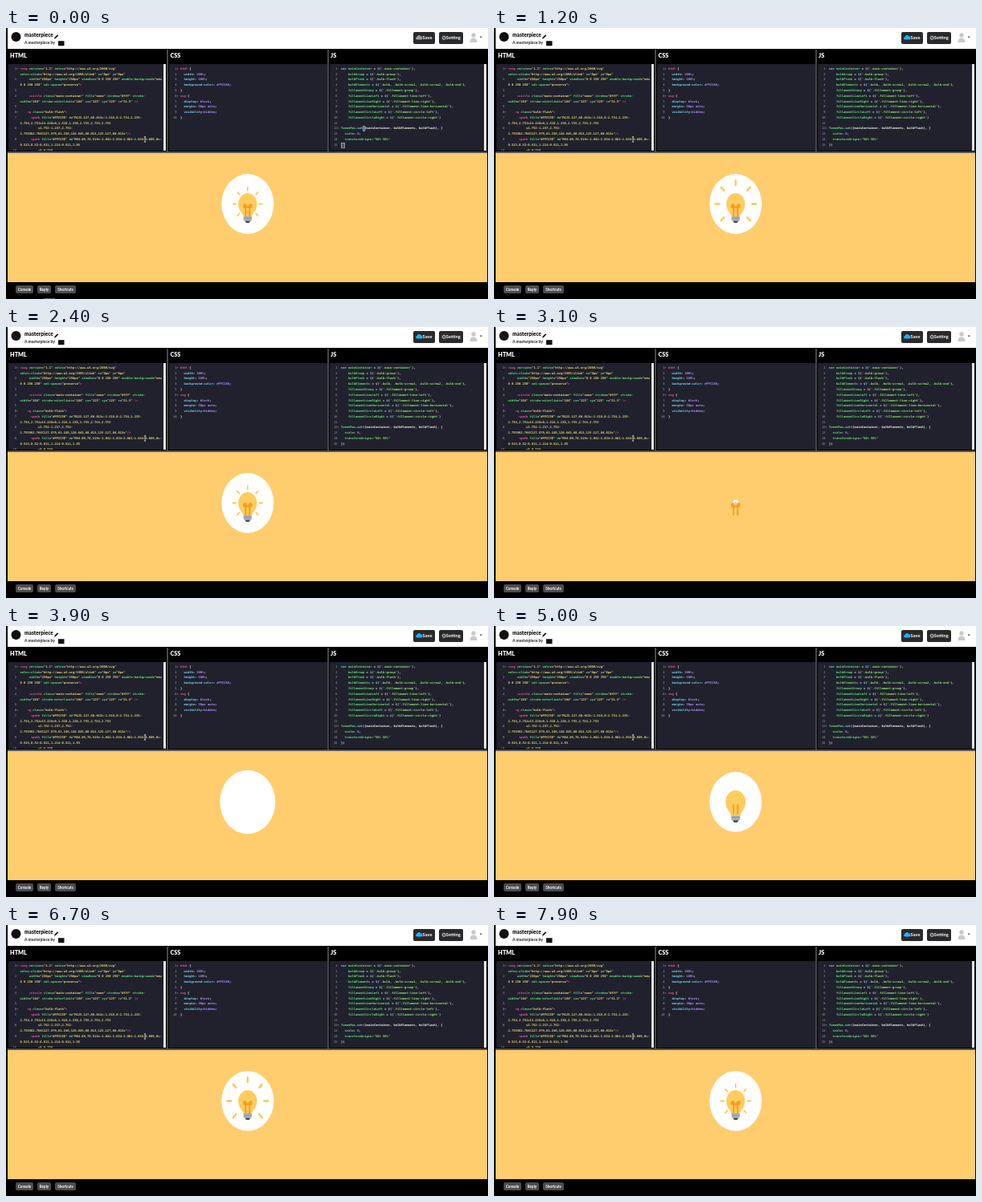
Write an HTML page that moves like this. It is 600 px wide and 338 px high and loops after 8000 ms.

```html
<!DOCTYPE html>
<html lang="en">
<head>
<meta charset="utf-8">
<title>masterpiece</title>
<style>
html, body { margin: 0; width: 100%; height: 100%; overflow: hidden; background: #000; }
#stage { position: relative; width: 600px; height: 338px; overflow: hidden; background: #000; font-family: Lato, "Open Sans", sans-serif; }
#stage > * { position: absolute; }
#bar { left: 2px; top: 0; width: 598px; height: 25.6px; background: #fff; }
.label { font-weight: 900; line-height: 10px; white-space: nowrap; }
.btn { box-sizing: border-box; border-radius: 2px; color: #fff; font-weight: 700; text-align: center; white-space: nowrap; }
.top { top: 5px; height: 15px; line-height: 14.5px; font-size: 5.7px; background: #2a2a2d; }
.foot { top: 321px; height: 10px; line-height: 10px; font-size: 4.6px; background: #4c4c51; }
.panel { top: 45px; height: 108px; background: #20212d; overflow: hidden; }
.panel pre { position: absolute; top: 2.9px; margin: 0; font: 700 3.76px/6.78px "DejaVu Sans Mono", "Liberation Mono", monospace; color: #f4f4ee; white-space: pre; }
.panel .nums { left: 0; width: 12.3px; text-align: right; color: #a4a5ae; font-weight: 400; }
.panel .code { left: 14.5px; }
.scroll::after { content: ""; position: absolute; right: .3px; top: 0; width: 2.5px; height: 100%; background: #e9e9e4; }
.str { color: #e6db74; } .tag { color: #f0569a; } .attr { color: #62df78; }
.key { color: #7cd8ee; } .num { color: #b491ff; }
#js .str { color: #8fe673; }
.gap { top: 27px; width: 1.5px; height: 127px; background: #46464a; }
.match { box-sizing: border-box; height: 7px; background: #555762; border: .6px solid #b9bac2; opacity: .75; }
#out { left: 2px; top: 156px; width: 597.3px; height: 161.3px; background: #ffcc6e; }
#art { left: 0; top: 0; }
</style>
</head>
<body>
<div id="stage">
  <div id="bar"></div>
  <div class="label" style="left:23px;top:4px;font-size:6.5px;color:#111">masterpiece</div>
  <div class="label" style="left:23px;top:13px;font-size:4.9px;color:#444">A masterpiece by</div>
  <div class="btn top" style="left:507px;width:27px;padding-left:8px">Save</div>
  <div class="btn top" style="left:538.5px;width:30.5px;padding-left:6px">Setting</div>
  <div class="label" style="left:5px;top:30px;font-size:7.3px;color:#fff">HTML</div>
  <div class="label" style="left:204.5px;top:30px;font-size:7.3px;color:#fff">CSS</div>
  <div class="label" style="left:404px;top:30px;font-size:7.3px;color:#fff">JS</div>
  <div class="panel scroll" id="html" style="left:3px;width:196px"></div>
  <div class="panel" id="css" style="left:202.5px;width:197px"></div>
  <div class="panel scroll" id="js" style="left:402.5px;width:195.5px"></div>
  <div class="gap" style="left:200px"></div>
  <div class="gap" style="left:400.3px"></div>
  <div style="left:2px;top:153.6px;width:597.3px;height:2.4px;background:#55555a"></div>
  <div id="out"></div>
  <div class="btn foot" style="left:12px;width:22px">Console</div>
  <div class="btn foot" style="left:39px;width:17px">Reply</div>
  <div class="btn foot" style="left:61px;width:26px">Shortcuts</div>
  <div class="match focus" style="left:443.6px;top:122px;width:3px"></div>
  <div class="match focus" style="left:416.6px;top:142.6px;width:5.6px"></div>
  <div class="focus" style="left:47px;top:337px;width:14px;height:1px;background:#555"></div>

  <svg id="art" width="600" height="338" viewBox="0 0 600 338">
    <circle cx="12.5" cy="11" r="6" fill="#111"/>
    <path d="M60 13.8l.7-2.4 3.3-3.2 1.3 1.3-3.3 3.3z" fill="#111"/>
    <rect x="65" y="16.2" width="7.5" height="6" fill="#111"/>
    <path id="cloud" d="M511.8 14.6a1.8 1.8 0 0 1 0-3.6 2.3 2.3 0 0 1 4.4-.6 2.1 2.1 0 0 1 .5 4.2z"/>
    <circle cx="545.2" cy="12.3" r="1.7" fill="none" stroke="#ddd" stroke-width=".9"/>
    <circle cx="545.2" cy="12.3" r="2.4" fill="none" stroke="#ddd" stroke-width=".7" stroke-dasharray=".94"/>
    <g fill="#c9c9c9"><circle cx="582" cy="9" r="2.7"/><path d="M577.5 18q0-5.5 4.5-5.5t4.5 5.5z"/></g>
    <path d="M589.6 10.6h3l-1.5 1.8z" fill="#444"/>
    <path d="M171.8 135.8h2.4M173 135.8v6.2M171.8 142h2.4" fill="none" stroke="#e4e4e4" stroke-width=".8"/>
    <g transform="translate(300.8 219.5) scale(.314 .362)">
      <circle id="disc" r="103.5" fill="#fff"/>
      <g id="rays" fill="none" stroke="#ffc54d" stroke-width="7" stroke-linecap="round"></g>
      <g id="bulb">
        <path d="M-17 43C-17 34-37 24-37 0A37 37 0 0 1 37 0C37 24 17 34 17 43z" fill="#ffcc5e"/>
        <path d="M-16 43h32v13q0 2-3 2h-26q-3 0-3-2z" fill="#a9b0b7"/>
        <path d="M-16 49h32" stroke="#7f878f" stroke-width="2"/>
        <path d="M-11 58h22l-5 7h-12z" fill="#464a50"/>
      </g>
      <g fill="none" stroke="#f39a1e" stroke-width="6">
        <path id="wires" d="M-8 43v-35M8 43v-35" pathLength="35"/>
        <g id="coil"><path d="M-10 11h20"/><circle cx="-11" cy="7" r="4.5"/><circle cx="11" cy="7" r="4.5"/></g>
      </g>
    </g>
  </svg>
</div>
<script>
const LOOP = 8000, CYCLE = 5500, OFFSET = 2200, SAVED_AT = 500;
const $ = id => document.getElementById(id);

const sources = {
  html: `<svg version="1.1" xmlns="http://www.w3.org/2000/svg"
xmlns:xlink="http://www.w3.org/1999/xlink" x="0px" y="0px"
     width="250px" height="250px" viewBox="0 0 250 250" enable-background="new
0 0 250 250" xml:space="preserve">

     <circle class="main-container" fill="none" stroke="#fff" stroke-
width="104" stroke-miterlimit="104" cx="125" cy="125" r="51.5" />

    <g class="bulb-flash">
      <path fill="#FFCC5E" d="M125.127,60.013c-1.518,0-2.754,1.235-
2.754,2.751v13.226c0,1.518,1.236,2.755,2.754,2.755
          s2.752-1.237,2.752-
2.755V62.764C127.879,61.248,126.645,60.013,125.127,60.013z"/>
      <path fill="#FFCC5E" d="M84.09,78.519c-1.041-1.034-2.061-1.034-3.089,0c-
0.523,0.52-0.811,1.214-0.811,1.95
          c0,0.736`,
  css: `html {
  width: 100%;
  height: 100%;
  background-color: #FFCC6E;
}
svg {
  display: block;
  margin: 50px auto;
  visibility:hidden;
}`,
  js: `var mainContainer = $('.main-container'),
    bulbGroup = $('.bulb-group'),
    bulbFlash = $('.bulb-flash'),
    bulbElements = $('.bulb, .bulb-screw1, .bulb-screw2, .bulb-end'),
    fillamentGroup = $('.fillament-group'),
    fillamentLineLeft = $('.fillament-line-left'),
    fillamentLineRight = $('.fillament-line-right'),
    fillamentLineHorizontal = $('.fillament-line-horizontal'),
    fillamentCircleLeft = $('.fillament-circle-left'),
    fillamentCircleRight = $('.fillament-circle-right')

TweenMax.set([mainContainer, bulbElements, bulbFlash], {
  scale: 0,
  transformOrigin:"50% 50%"
})`
};

// Each language: a pattern whose named groups are the colour classes.
const grammars = {
  html: /(?<str>"[^"]*"?)|(?<tag><\w+|\/?>)|(?<attr>[\w:-]+)/g,
  css: /(?<tag>^\w+(?= \{))|(?<key>[\w-]+(?=:))|(?<num>#?\w+%?)/gm,
  js: /(?<str>'[^']*'|"[^"]*")|(?<key>\bvar\b|\$|\bset\b)|(?<num>\b\d+)|(?<attr>\w+(?= =|:|\.))/g
};

const wrapped = new Set([1, 3, 6, 10, 12, 14]);
const foldable = /\{$|<svg|<g /;

function addPre(panel, cls) {
  const pre = document.createElement('pre');
  pre.className = cls;
  return panel.appendChild(pre);
}

function addNumbers(lang, text) {
  let n = 0;
  addPre($(lang), 'nums').textContent = text.split('\n').map((line, i) => {
    const label = lang === 'html' && wrapped.has(i) ? ' ' : ++n;
    return label + (foldable.test(line) ? '▾' : '\u00a0');
  }).join('\n');
}

function addCode(lang, text) {
  const code = addPre($(lang), 'code');
  let last = 0;
  for (const m of text.matchAll(grammars[lang])) {
    code.append(text.slice(last, m.index));
    const token = document.createElement('span');
    token.className = Object.keys(m.groups).find(k => m.groups[k] !== undefined);
    token.textContent = m[0];
    code.append(token);
    last = m.index + m[0].length;
  }
  code.append(text.slice(last));
}

for (const [lang, text] of Object.entries(sources)) {
  addNumbers(lang, text);
  addCode(lang, text);
}

// Seven rays, leaving the bottom free for the screw base.
$('rays').innerHTML = [-135, -90, -45, 0, 45, 90, 135]
  .map(a => `<path d="M0-65v-16" transform="rotate(${a})"/>`).join('');

const span = (p, from, to) => Math.min(1, Math.max(0, (p - from) / (to - from)));
const backOut = x => 1 + 2.7 * (x - 1) ** 3 + 1.7 * (x - 1) ** 2;
const shrink = x => 1 - x * x;

function setScale(id, sx, sy = sx) {
  $(id).setAttribute('transform', `scale(${sx.toFixed(4)} ${sy.toFixed(4)})`);
  $(id).style.display = sx > 0.001 && sy > 0.001 ? '' : 'none';
}

function draw(t) {
  const p = (t + OFFSET) % CYCLE;
  const leave = shrink(span(p, 4800, 5330));
  const last = 1 - span(p, 5350, 5450);
  setScale('disc', backOut(span(p, 0, 800)) * leave);
  setScale('bulb', backOut(span(p, 1000, 2000)) * leave);
  setScale('wires', last, span(p, 1300, 1700) * last);
  setScale('coil', span(p, 1700, 2000) * last);
  setScale('rays', backOut(span(p, 2000, 3000)) * shrink(span(p, 4400, 4780)));

  const saved = t >= SAVED_AT;
  $('cloud').setAttribute('fill', saved ? '#1fb2f5' : '#9a9a9c');
  document.querySelectorAll('.focus').forEach(e => e.style.display = saved ? 'none' : '');
}

const start = performance.now();
function tick() {
  draw((performance.now() - start) % LOOP);
  requestAnimationFrame(tick);
}
tick();
</script>
</body>
</html>
```
